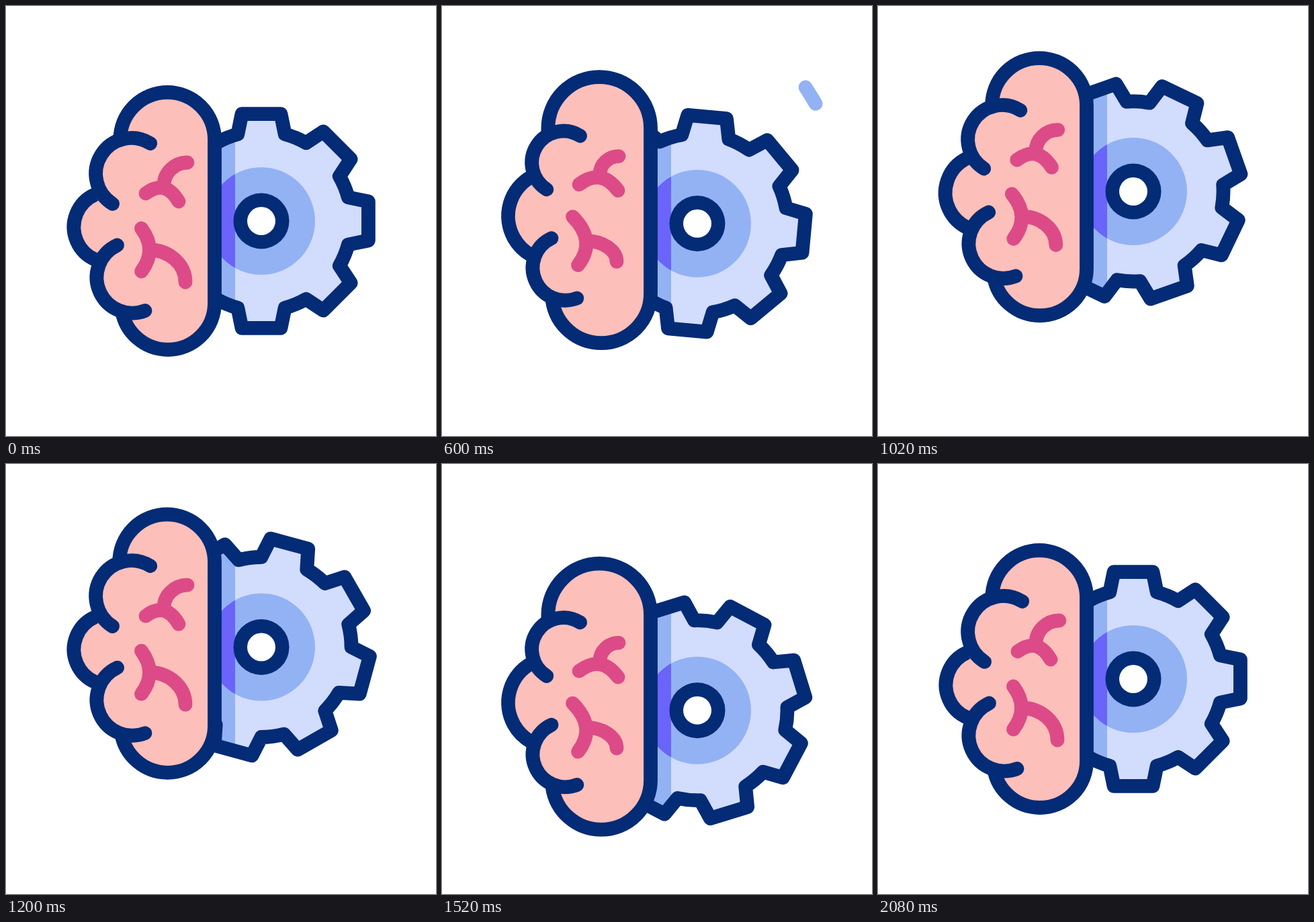
These frames come from a looping animation (640x640 px, 2400 ms). An HTML page with a canvas:

```html
<!DOCTYPE html>
<html lang="en">
<head>
<meta charset="utf-8">
<title>Brain and gear</title>
<style>
html, body { margin: 0; width: 100%; height: 100%; overflow: hidden; background: #fff; }
canvas { display: block; width: 100vw; height: 100vh; }
</style>
</head>
<body>
<canvas id="stage" width="640" height="640"></canvas>
<script>
const ctx = document.getElementById('stage').getContext('2d');
const LOOP = 2400, MIDDLE = 320, TAU = Math.PI * 2, DEG = Math.PI / 180, LINE = 20.8;
const NAVY = '#042b75', SKIN = '#fdbfba', ROSE = '#dc4b87';
const PALE = '#d2dcfd', BLUE = '#93b2f4', VIOLET = '#6a64fa';
const SPINE = 310.5, GEAR_X = 380;

// Key points of the motion: time in ms, then offset in px or angle in degrees.
const brainKeys = [[220, 0], [460, 49], [600, -16.2], [880, -46.8], [1195, -53],
  [1455, 50], [1520, 26.5], [1735, -25.5], [2080, 0]];
const gearKeys = [[220, 0], [505, 46], [600, 4], [880, -38], [1205, -47.5],
  [1512, 47], [1745, -18], [2080, 0]];
const spinKeys = [[220, 0], [600, 95], [880, 175], [1200, 240], [1520, 297.7], [1740, 326], [2080, 360]];

const lerp = (a, b, u) => a + (b - a) * u;
const clamp = u => Math.min(1, Math.max(0, u));
const smooth = (a, b, t) => {
  const u = clamp((t - a) / (b - a));
  return u * u * (3 - 2 * u);
};

// Monotone cubic through the keys, level at peaks and ends.
function curve(keys, t) {
  let i = 0;
  while (i < keys.length - 2 && t > keys[i + 1][0]) i++;
  const rate = k => (keys[k + 1][1] - keys[k][1]) / (keys[k + 1][0] - keys[k][0]);
  const slope = k => {
    if (k < 1 || k > keys.length - 2) return 0;
    const a = rate(k - 1), b = rate(k);
    return a * b > 0 ? 2 * a * b / (a + b) : 0;
  };
  const [t0, v0] = keys[i], [t1, v1] = keys[i + 1], h = t1 - t0;
  const u = clamp((t - t0) / h), w = 1 - u;
  return v0 * w * w * (1 + 2 * u) + v1 * u * u * (1 + 2 * w)
    + h * u * w * (w * slope(i) - u * slope(i + 1));
}

function pen(color, cap = 'round') {
  ctx.strokeStyle = color;
  ctx.lineWidth = LINE;
  ctx.lineCap = cap;
  ctx.lineJoin = 'round';
}

function disc(x, y, r, color) {
  ctx.beginPath();
  ctx.arc(x, y, r, 0, TAU);
  ctx.fillStyle = color;
  ctx.fill();
}

function gearPath(cy, turn) {
  const at = (r, a) => [GEAR_X + r * Math.sin(a), cy - r * Math.cos(a)];
  const rBase = 134, base = 15.2 * DEG, rTip = 162, tip = 10.3 * DEG;
  ctx.beginPath();
  for (let k = 0; k < 8; k++) {
    const a = turn + k * TAU / 8;
    ctx.lineTo(...at(rBase, a - base));
    ctx.lineTo(...at(rTip, a - tip));
    ctx.lineTo(...at(rTip, a + tip));
    ctx.lineTo(...at(rBase, a + base));
    ctx.arc(GEAR_X, cy, rBase, a + base - TAU / 4, a + TAU / 8 - base - TAU / 4);
  }
  ctx.closePath();
}

function drawGear(cy, turn) {
  ctx.save();
  ctx.beginPath();
  ctx.rect(300, 0, 340, 640);
  ctx.clip();

  ctx.save();
  gearPath(cy, turn);
  ctx.clip();
  ctx.fillStyle = PALE;
  ctx.fillRect(300, 0, 340, 640);
  ctx.fillStyle = BLUE;
  ctx.fillRect(300, 0, 41, 640);
  disc(GEAR_X, cy, 80, BLUE);
  ctx.beginPath();
  ctx.rect(300, 0, 41, 640);
  ctx.clip();
  disc(GEAR_X, cy, 80, VIOLET);
  ctx.restore();

  pen(NAVY);
  gearPath(cy, turn);
  ctx.stroke();
  disc(GEAR_X, cy, 41.5, NAVY);
  disc(GEAR_X, cy, 21, '#fff');
  ctx.restore();
}

// Quarter of an ellipse that leaves sideways and arrives upright.
function quarter(x0, y0, x1, y1) {
  const k = 0.55;
  ctx.moveTo(x0, y0);
  ctx.bezierCurveTo(lerp(x0, x1, k), y0, x1, lerp(y1, y0, k), x1, y1);
}

function drawFolds(swell) {
  const bulge = lerp(12, 16, swell);
  pen(ROSE);
  ctx.beginPath();
  quarter(270 - 7 * swell, -87 + 7 * swell, 235, -53);
  ctx.moveTo(208 - 4 * swell, -41 + 3 * swell);
  ctx.quadraticCurveTo(237, -63, 257 + 5 * swell, -29);
  const x = 201.5 - 3 * swell, y = 43 + 3 * swell;
  const reach = 32 + 4 * swell;
  ctx.moveTo(x - 4 * swell, y - reach);
  ctx.quadraticCurveTo(x + 2 * bulge, y, x + 4 * swell, y + reach);
  quarter(x + bulge, y, 267 - 7 * swell, 91 - 14 * swell);
  ctx.stroke();
}

// The body stretches with speed; the lobes swell and relax after each bounce.
function drawBrain(t) {
  const speed = (curve(brainKeys, t + 2) - curve(brainKeys, t - 2)) / 4;
  const stretch = Math.min(1, (speed / 0.17) ** 2);
  const swell = smooth(220, 560, t) - smooth(720, 1200, t) + smooth(1200, 1480, t) - smooth(1520, 2080, t);
  const half = 191.5 + 6.5 * stretch;
  const rTop = 70.3 + 6 * stretch, rBottom = 69.5 + 4 * stretch;

  const lobe = (left, y, r, from, to) => ({ x: left + r, y, r, from: from * DEG, to: to * DEG });
  const upper = lobe(133.7, -70.5, 53 - 6 * swell, -58, 122);
  const lower = lobe(135, 84 + 2 * swell, 53 - 4.5 * swell, -115, 69);
  const back = lobe(101 - 2.5 * swell, 9, 53 + 14 * swell, 0, 0);
  back.to = Math.acos((133 - back.x) / back.r);
  back.from = -back.to;

  const body = gap => {
    ctx.beginPath();
    ctx.moveTo(SPINE - 2 * rTop, rTop - half + 5);
    ctx.arc(SPINE - rTop, rTop - half, rTop, Math.PI, TAU);
    ctx.arc(SPINE - rBottom, half - rBottom, rBottom, 0, Math.PI - gap);
  };

  ctx.save();
  ctx.translate(0, MIDDLE + curve(brainKeys, t));
  body(0);
  ctx.fillStyle = SKIN;
  ctx.fill();
  for (const c of [upper, back, lower]) disc(c.x, c.y, c.r, SKIN);
  drawFolds(swell);

  pen(NAVY, 'butt');
  body(0.15);
  ctx.stroke();
  for (const c of [back, upper, lower]) {
    pen(NAVY, c === back ? 'butt' : 'round');
    ctx.beginPath();
    ctx.arc(c.x, c.y, c.r, c.from, c.to, true);
    ctx.stroke();
  }
  ctx.restore();
}

function drawSwoosh(t) {
  const from = smooth(670, 950, t), to = smooth(560, 820, t);
  if (to <= 0 || from >= 1) return;
  const bezier = (a, b, c, d, u) => {
    const w = 1 - u;
    return a * w * w * w + 3 * b * w * w * u + 3 * c * w * u * u + d * u * u * u;
  };
  pen(BLUE);
  ctx.beginPath();
  for (let k = 0; k <= 40; k++) {
    const u = lerp(from, to, k / 40);
    ctx.lineTo(bezier(541, 621, 632, 552, u), bezier(121, 246, 318, 457, u));
  }
  ctx.stroke();
}

function draw(now) {
  const t = now % LOOP;
  ctx.fillStyle = '#fff';
  ctx.fillRect(0, 0, 640, 640);
  drawSwoosh(t);
  drawGear(MIDDLE + curve(gearKeys, t), curve(spinKeys, t) * DEG);
  drawBrain(t);
}

const start = performance.now();
function tick() {
  draw(performance.now() - start);
  requestAnimationFrame(tick);
}
tick();
</script>
</body>
</html>
```
